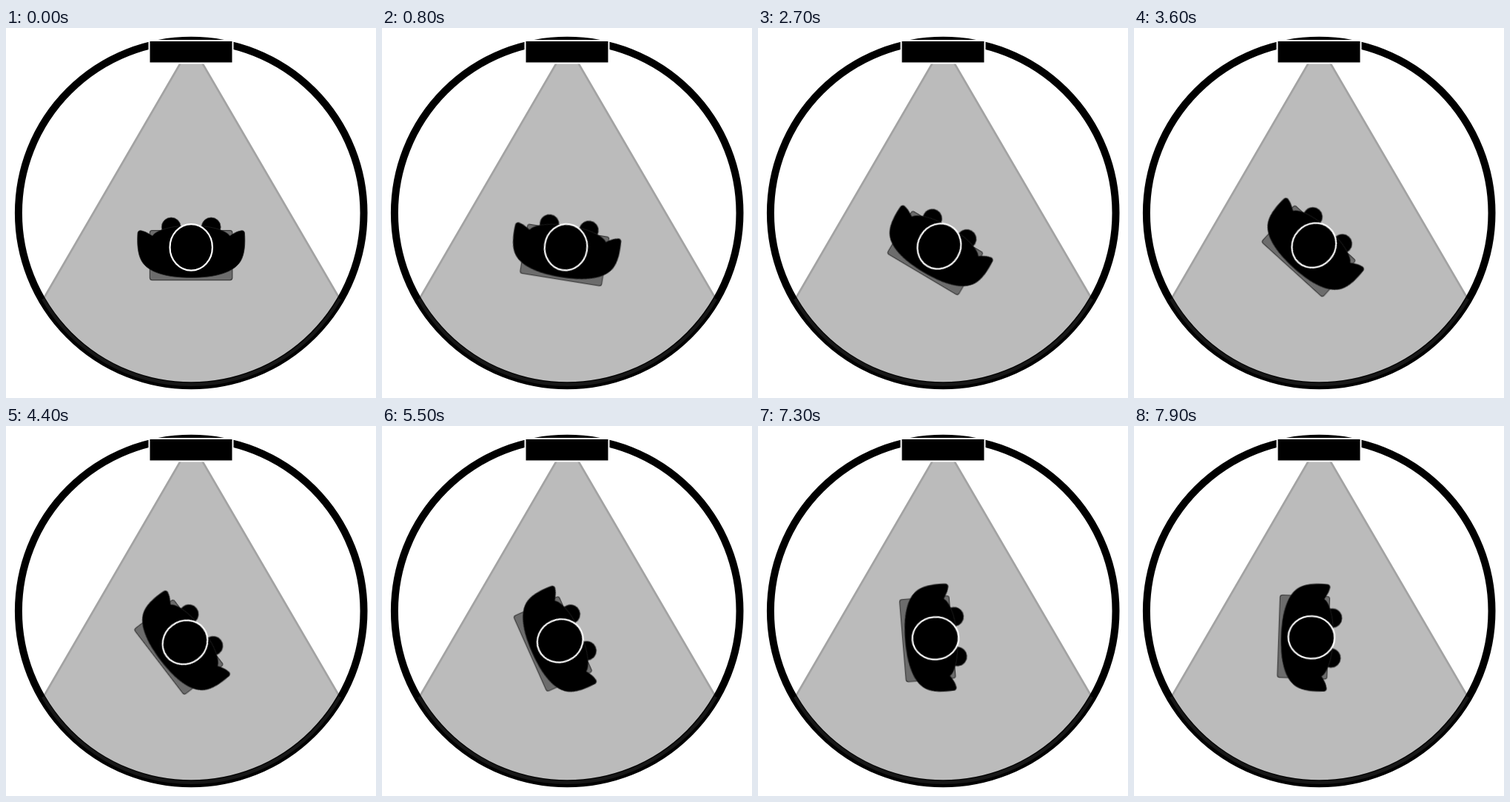
An HTML page that plays this animation: 500 by 500 pixels, repeating every 8000 ms.

```html
<!DOCTYPE html>
<html lang="en">
<head>
<meta charset="utf-8">
<title>Turning figure in a camera's view</title>
<style>
  html, body { margin: 0; width: 100%; height: 100%; overflow: hidden; background: #fff; }
  svg { display: block; width: 100%; height: 100%; }

  .ring { fill: none; stroke: #000; stroke-width: 10; }
  .view { fill: #bbb; }
  .edge { fill: none; stroke: #a3a3a3; stroke-width: 2.6; }
  .rim { fill: none; stroke: #171717; stroke-width: 4.5; }
  .camera { stroke: #fff; stroke-width: 2; }
  .seat { fill: #6c6c6c; stroke: #3c3c3c; stroke-width: 1.2; }
  .hand, .body { stroke: #555; stroke-width: .8; }
  .body { stroke: #222; }
  .head { stroke: #fff; stroke-width: 2.2; }

  /* The turn advances in 100 ms ticks. */
  .person { transform-origin: 250.2px 286px; animation: turn 8s infinite; }
  @keyframes turn {
    0%     { transform: rotate(0deg);    animation-timing-function: steps(15); }
    18.75% { transform: rotate(17.2deg); animation-timing-function: steps(12); }
    33.75% { transform: rotate(30.7deg); animation-timing-function: steps(17); }
    55%    { transform: rotate(52.5deg); animation-timing-function: steps(11); }
    68.75% { transform: rotate(66deg);   animation-timing-function: steps(11); }
    82.5%  { transform: rotate(77.5deg); animation-timing-function: steps(13); }
    98.75%, 100% { transform: rotate(92deg); }
  }
</style>
</head>
<body>
<svg viewBox="0 0 500 500">
  <path class="view" d="M236 47 L50 367 A231.5 231.5 0 0 0 451.5 367 L265 47 Z"/>
  <path class="edge" d="M236 47 L50 367 M265 47 L451.5 367"/>
  <circle class="ring" cx="250.2" cy="250" r="233.3"/>
  <path class="rim" d="M50 366 A231.5 231.5 0 0 0 451 366"/>
  <rect class="camera" x="193.5" y="17" width="113" height="30.5"/>

  <g class="person">
    <rect class="seat" x="194.4" y="273.6" width="111.4" height="67" rx="3"/>
    <circle class="hand" cx="223.2" cy="269" r="13"/>
    <circle class="hand" cx="277.2" cy="269" r="13"/>
    <path class="body" d="M178 277 C178.5 273.5 181 273.5 184 274.2
      C190 275.5 194 279 198 281 C203 273 224 267 250.2 267
      C276 267 297 273 302.4 281 C306 279 310 275.5 316.4 274.2
      C319.4 273.5 322 273.5 322.4 277 C323.5 291 322.5 306 317 315
      C308 330 284 337.3 250.2 337.3 C216 337.3 192 330 183.4 315
      C178 306 177 291 178 277 Z"/>
    <ellipse class="head" cx="250.2" cy="296.4" rx="28.7" ry="31.2"/>
  </g>
</svg>
</body>
</html>
```
